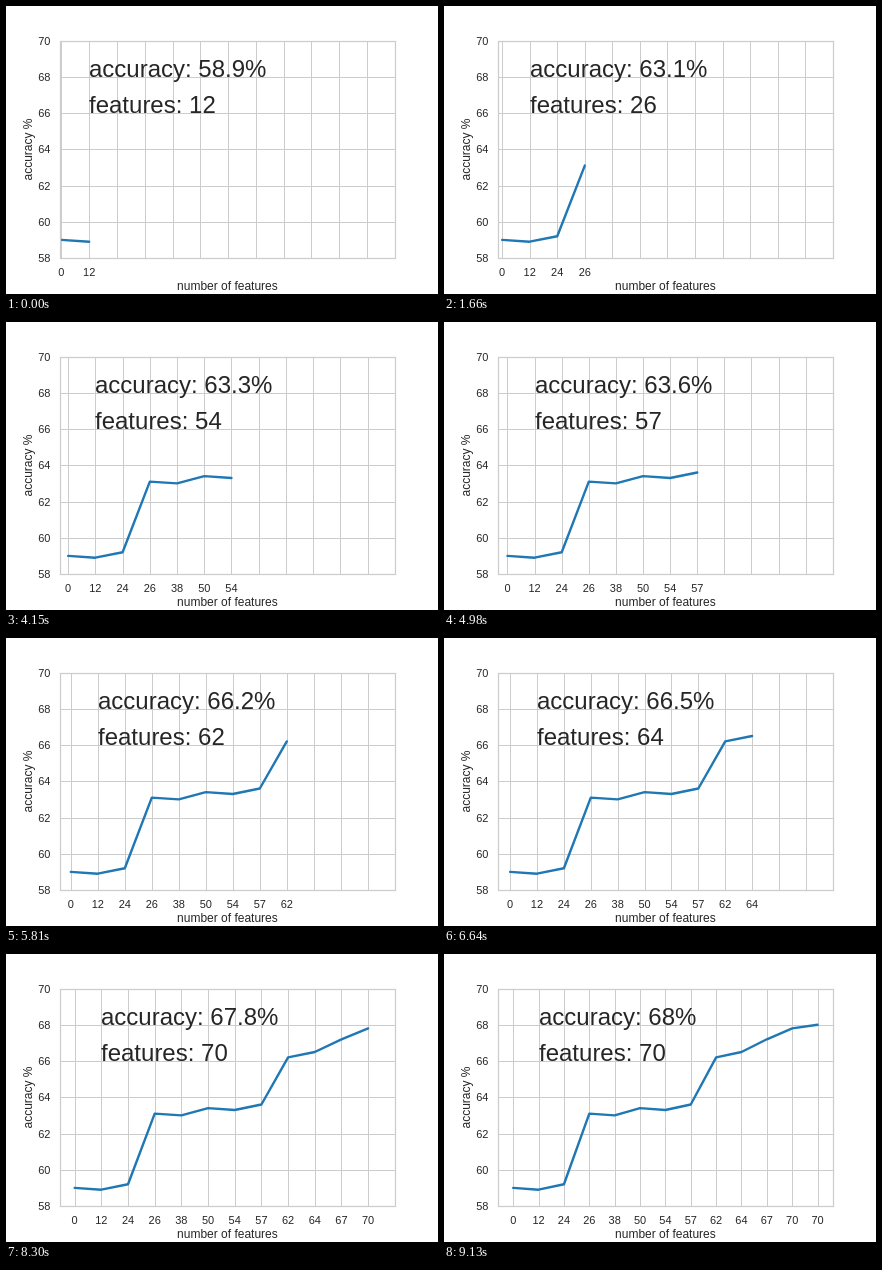
Write an HTML page that moves like this. It is 432x288 px and loops after 9960 ms.

```html
<!DOCTYPE html>
<html lang="en">
<head>
<meta charset="utf-8">
<title>Accuracy by number of features</title>
<style>
  html, body { margin: 0; width: 100%; height: 100%; overflow: hidden; background: #fff; }
  svg { display: block; width: 432px; height: 288px; }
  text { font: 11px "Liberation Sans", Arial, sans-serif; fill: #262626; }
  .axis { font-size: 12px; text-anchor: middle; }
  .big { font-size: 24px; }
  .xtick { text-anchor: middle; }
  .ytick { text-anchor: end; }
  .grid { stroke: #ccc; stroke-width: 1; }
  .frame { fill: none; stroke: #ccc; stroke-width: 1.25; }
  .curve { fill: none; stroke: #1f77b4; stroke-width: 2.4; stroke-linecap: round; stroke-linejoin: round; }
</style>
</head>
<body>
<svg id="chart" viewBox="0 0 432 288" xmlns="http://www.w3.org/2000/svg"></svg>
<script>
  const STEP = 830;
  const LEFT = 54, RIGHT = 388.8, TOP = 34.56, BOTTOM = 252;
  const Y_MIN = 58, Y_MAX = 70;
  const features = [0, 12, 24, 26, 38, 50, 54, 57, 62, 64, 67, 70, 70];
  const accuracy = [59, 58.9, 59.2, 63.1, 63, 63.4, 63.3, 63.6, 66.2, 66.5, 67.2, 67.8, 68];
  const last = features.length - 1;
  const svg = document.getElementById('chart');

  const set = (el, attrs) => {
    for (const k in attrs) el.setAttribute(k, attrs[k]);
  };

  function add(tag, attrs, text, parent = svg) {
    const el = document.createElementNS(svg.namespaceURI, tag);
    set(el, attrs);
    if (text !== undefined) el.textContent = text;
    return parent.appendChild(el);
  }

  const snap = v => Math.round(v) + 0.5;
  const yPos = v => BOTTOM - (v - Y_MIN) / (Y_MAX - Y_MIN) * (BOTTOM - TOP);

  const clip = add('clipPath', { id: 'plot' });
  add('rect', { x: LEFT, y: TOP, width: RIGHT - LEFT, height: BOTTOM - TOP }, undefined, clip);

  const gridX = features.map(() => add('line', { class: 'grid', y1: 35, y2: 253 }));
  for (let v = Y_MIN; v <= Y_MAX; v += 2) {
    const y = snap(yPos(v));
    add('line', { class: 'grid', x1: 54, x2: 390, y1: y, y2: y });
    add('text', { class: 'ytick', x: 44.5, y: Math.round(yPos(v)) + 4 }, v);
  }

  const curve = add('polyline', { class: 'curve', 'clip-path': 'url(#plot)' });
  add('rect', { class: 'frame', x: 54.5, y: 35.5, width: 335, height: 217 });

  const ticks = features.map(() => add('text', { class: 'xtick', y: 270 }));
  const accuracyText = add('text', { class: 'big', y: 71 });
  const featuresText = add('text', { class: 'big', y: 107 });
  add('text', { class: 'axis', x: 221.4, y: 284 }, 'number of features');
  add('text', { class: 'axis', transform: 'translate(25.5 143.5) rotate(-90)' }, 'accuracy %');

  // Draws the curve up to point n; the x margin grows with the data.
  function draw(n) {
    const margin = 0.05 * n;
    const xMax = Math.max(last, n + margin);
    const xPos = i => LEFT + (i + margin) / (xMax + margin) * (RIGHT - LEFT);

    features.forEach((count, i) => {
      const x = snap(xPos(i));
      set(gridX[i], { x1: x, x2: x });
      set(ticks[i], { x: xPos(i) });
      ticks[i].textContent = i <= n ? count : '';
    });

    const points = accuracy.slice(0, n + 1).map((v, i) => xPos(i) + ',' + yPos(v));
    set(curve, { points: points.join(' ') });

    const textX = Math.round(xPos(1));
    set(accuracyText, { x: textX });
    set(featuresText, { x: textX });
    accuracyText.textContent = `accuracy: ${accuracy[n]}%`;
    featuresText.textContent = `features: ${features[n]}`;
  }

  let shown = 1;
  draw(shown);
  const start = performance.now();

  function tick() {
    const elapsed = performance.now() - start;
    const n = 1 + Math.floor(elapsed / STEP) % last;
    if (n !== shown) draw(shown = n);
    requestAnimationFrame(tick);
  }
  requestAnimationFrame(tick);
</script>
</body>
</html>
```
